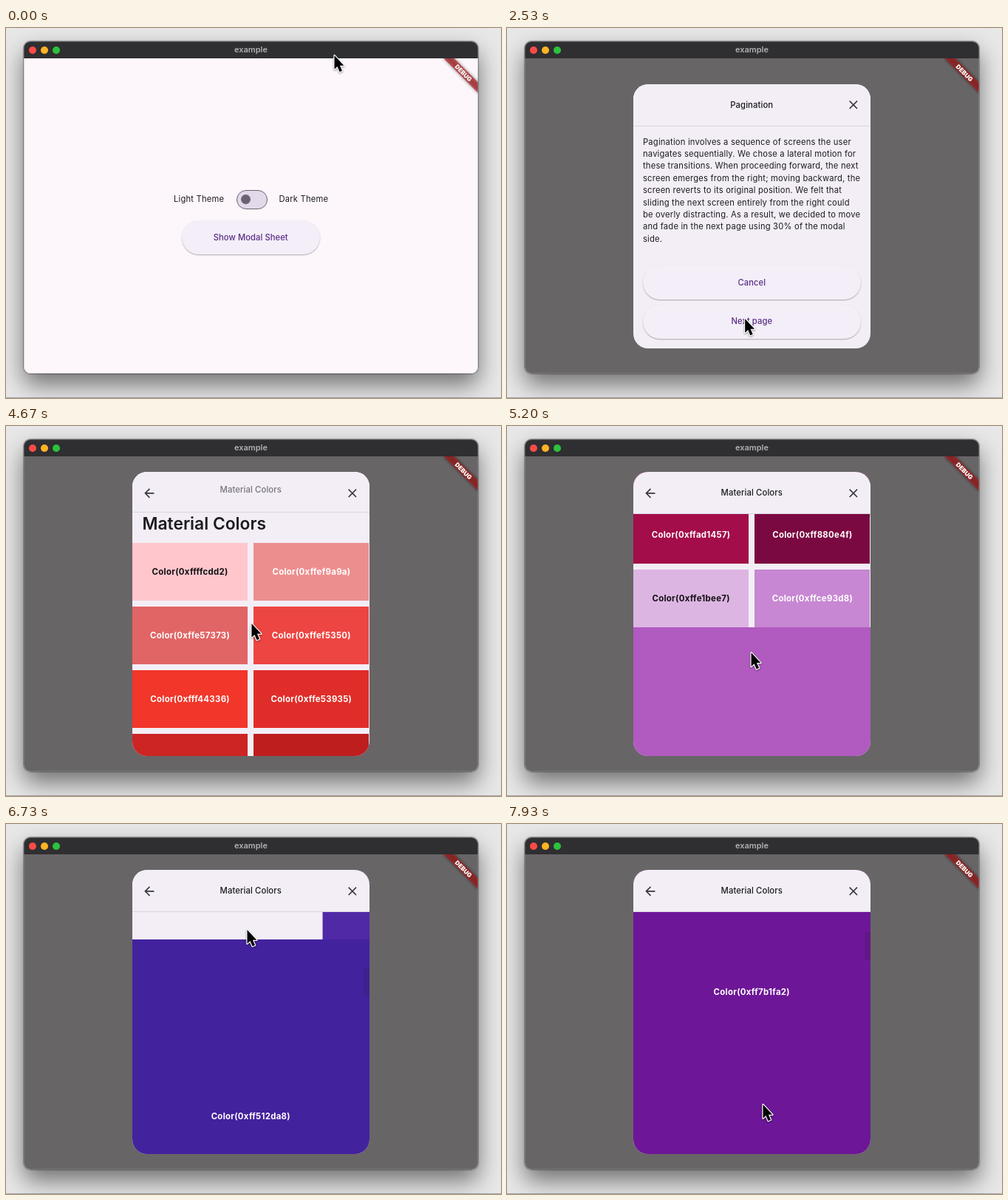
An HTML page for the animation above (8 s loop, 670 by 500 pixels).

```html
<!DOCTYPE html>
<html lang="en">
<head>
<meta charset="utf-8">
<title>Modal sheet</title>
<style>
html, body { margin: 0; width: 100%; height: 100%; overflow: hidden; }
body { position: relative; background: #e8e8e8; font: 400 11.2px/16.4px Inter, "Open Sans", sans-serif; color: #1d1b20; }
div, svg { position: absolute; box-sizing: border-box; }
.mid { display: flex; align-items: center; justify-content: center; white-space: nowrap; }

#stage { left: 0; top: 0; width: 670px; height: 500px; overflow: hidden; }
#floor { left: 0; top: 499px; width: 670px; height: 1px; background: #a6a6a6; }
#shadow, #win, #rim { left: 24px; top: 18px; width: 615px; height: 449px; border-radius: 9px; }
#shadow { box-shadow: 0 15px 32px rgba(0,0,0,.52), 0 0 1px 1px rgba(0,0,0,.3); }
#win { overflow: hidden; background: #fdf7fc; }
#rim { box-shadow: inset 0 0 0 1px rgba(150,150,150,.4); }
/* children of the window use stage coordinates */
#app { left: -24px; top: -18px; width: 670px; height: 500px; }
#bar { left: 24px; top: 18px; width: 615px; height: 23px; background: #2f2e31; color: #b2b1b3; font-weight: 600; font-size: 11px; }
.light { top: 6.5px; width: 10px; height: 10px; border-radius: 50%; }

.label { top: 223px; letter-spacing: .2px; white-space: nowrap; }
#track { left: 311.5px; top: 218.5px; width: 42px; height: 26px; border-radius: 13px; background: #e2daea; border: 1.7px solid #6b6470; }
#knob { left: 318px; top: 225px; width: 13px; height: 13px; border-radius: 50%; background: #6b6470; }
.btn { border-radius: 23px; background: #f3eef7; color: #5a2e87; font-weight: 500; letter-spacing: .08px; box-shadow: 0 1px 1.5px rgba(0,0,0,.3); }
#show { left: 238px; top: 260px; width: 186.5px; height: 45.5px; }
#ink { inset: 0; border-radius: 23px; overflow: hidden; }
#tint { inset: 0; background: #673ab7; }
#ripple { border-radius: 50%; background: #673ab7; }

#scrim { left: 24px; top: 41px; width: 615px; height: 426px; background: #000; }
#sheet { left: 171px; width: 320.5px; border-radius: 20px; overflow: hidden; background: #f3eef6; }
.page { left: 0; top: 0; width: 100%; height: 100%; }
.top { left: 0; top: 0; width: 100%; height: 57px; background: #f3eef6; border-bottom: 1px solid #d9d4dd; }
.title { left: 0; top: 0; width: 100%; height: 57px; font-weight: 500; font-size: 11.3px; letter-spacing: .1px; }
#copy { left: 13px; right: 13px; top: 70px; letter-spacing: .2px; }
.wide { left: 13px; right: 13px; height: 46px; }
#hero { left: 0; top: 0; width: 320.5px; height: 197px; background: #fffcfd; }
#heading { left: 13.5px; top: 209px; height: 32px; line-height: 32px; font-size: 22.8px; font-weight: 600; white-space: nowrap; }
.tile { font-weight: 700; font-size: 11.4px; letter-spacing: .3px; color: #fff; }
#thumb { right: 0; width: 8px; height: 37px; background: rgba(28,27,31,.13); }
.icon { top: 18.7px; width: 19.7px; height: 19.7px; fill: #39363d; }

#ribbon { left: 639px; top: 41px; width: 0; height: 0; transform: rotate(45deg); }
#ribbon div { left: -33px; top: 23px; width: 66px; height: 9.9px; }
#ribbon .dark { background: rgba(0,0,0,.5); filter: blur(2px); }
#ribbon .red { background: rgba(183,28,28,.63); color: #fff; font-weight: 900; font-size: 8.2px; }
#cursor { left: 0; top: 0; width: 24px; height: 32px; overflow: visible; filter: drop-shadow(0 1.5px 1.2px rgba(0,0,0,.4)); }
</style>
</head>
<body>
<div id="stage">
  <div id="floor"></div>
  <div id="shadow"></div>
  <div id="win"><div id="app">
    <div class="label" style="left:227px">Light Theme</div>
    <div class="label" style="left:369.5px">Dark Theme</div>
    <div id="track"></div><div id="knob"></div>
    <div id="show" class="btn">
      <div id="ink"><div id="tint"></div><div id="ripple"></div></div>
      <div class="mid" style="inset:0">Show Modal Sheet</div>
    </div>
    <div id="scrim"></div>
    <div id="sheet">
      <div id="intro" class="page">
        <div id="copy">Pagination involves a sequence of screens the user navigates sequentially. We chose a lateral motion for these transitions. When proceeding forward, the next screen emerges from the right; moving backward, the screen reverts to its original position. We felt that sliding the next screen entirely from the right could be overly distracting. As a result, we decided to move and fade in the next page using 30% of the modal side.</div>
        <div class="top"></div>
        <div class="title mid">Pagination</div>
        <div class="btn wide mid" style="bottom:65.5px">Cancel</div>
        <div class="btn wide mid" style="bottom:13px">Next page</div>
      </div>
      <div id="colors" class="page">
        <div id="list" class="page">
          <div id="hero"><svg width="320.5" height="197">
            <circle cx="77.5" cy="41.5" r="22.7" fill="#ff5500"/>
            <path d="M189.5 45.5 46 169.5H274Z" fill="#fb9d0e" stroke="#fb9d0e" stroke-width="8" stroke-linejoin="round"/>
          </svg></div>
          <div id="heading">Material Colors</div>
        </div>
        <div id="thumb"></div>
        <div id="top" class="top"></div>
        <div id="title" class="title mid">Material Colors</div>
      </div>
      <svg id="back" class="icon" style="left:13.2px" viewBox="0 0 24 24"><path d="M20 11H7.83l5.59-5.59L12 4l-8 8 8 8 1.41-1.41L7.83 13H20z"/></svg>
      <svg class="icon" style="left:288.2px" viewBox="0 0 24 24"><path d="M19 6.41 17.59 5 12 10.59 6.41 5 5 6.41 10.59 12 5 17.59 6.41 19 12 13.41 17.59 19 19 17.59 13.41 12z"/></svg>
    </div>
    <div id="ribbon"><div class="dark"></div><div class="red mid">DEBUG</div></div>
    <div id="bar" class="mid">example
      <div class="light" style="left:6.5px;background:#fb4b47"></div>
      <div class="light" style="left:22.5px;background:#fdb424"></div>
      <div class="light" style="left:38.5px;background:#2bc23e"></div>
    </div>
  </div></div>
  <div id="rim"></div>
  <svg id="cursor"><path d="M.5 0V18.7L4.5 15 7.6 22.2 11 20.7 7.9 13.7H13.4Z" stroke="#fff" stroke-width="2.4" paint-order="stroke" stroke-linejoin="round"/></svg>
</div>
<script>
const $ = id => document.getElementById(id);
const clamp = v => Math.min(1, Math.max(0, v));
const ramp = (v, a, b) => clamp((v - a) / (b - a));
const smooth = u => u * u * (3 - 2 * u);
const mix = (a, b, u) => a + (b - a) * u;

// Monotone cubic curve through [time, value...] points
function curve(pts, t, c = 1) {
  const last = pts.length - 1;
  if (t <= pts[0][0]) return pts[0][c];
  if (t >= pts[last][0]) return pts[last][c];
  let i = 0;
  while (t >= pts[i + 1][0]) i++;
  const slope = j => (pts[j + 1][c] - pts[j][c]) / (pts[j + 1][0] - pts[j][0]);
  const tangent = j => {
    if (j === 0 || j === last) return 0;
    const a = slope(j - 1), b = slope(j);
    return a * b <= 0 ? 0 : 2 * a * b / (a + b);
  };
  const h = pts[i + 1][0] - pts[i][0], u = (t - pts[i][0]) / h;
  return mix(pts[i][c], pts[i + 1][c], smooth(u))
    + h * u * (1 - u) * ((1 - u) * tangent(i) - u * tangent(i + 1));
}

const pointer = [
  [70, 444, 37], [400, 395, 165], [830, 342, 292], [1900, 342, 292],
  [2400, 322, 393], [3000, 321, 393], [3670, 319, 380], [4150, 324, 422],
  [4670, 332, 267], [4800, 333, 208], [5100, 331, 270], [5480, 328, 400],
  [5800, 328, 220], [5930, 327, 140], [6200, 327, 260], [6450, 326, 400],
  [6730, 326, 143], [6900, 326, 118], [7150, 330, 350], [7350, 335, 300],
  [7620, 342, 142], [7930, 346, 379], [8000, 347, 410]
];
const scroll = [
  [4150, 0], [4670, 155], [4780, 215], [5100, 800], [5480, 1080],
  [5800, 1263], [5920, 1345], [6150, 3200], [6450, 4580], [6730, 4837],
  [6820, 4868], [6950, 4880], [7150, 4650], [7350, 3900], [7620, 3330],
  [7930, 3091], [8000, 3000]
];

// Shades 100 to 900 of red, pink, purple, deep purple
const shades = (
  "ffcdd2 ef9a9a e57373 ef5350 f44336 e53935 d32f2f c62828 b71c1c " +
  "f8bbd0 f48fb1 f06292 ec407a e91e63 d81b60 c2185b ad1457 880e4f " +
  "e1bee7 ce93d8 ba68c8 ab47bc 9c27b0 8e24aa 7b1fa2 6a1b9a 4a148c " +
  "d1c4e9 b39ddb 9575cd 7e57c2 673ab7 5e35b1 512da8 4527a0 311b92").split(" ");
const W = 320.5, TALL = 478.5, GRID = 251, LIST = GRID + 852, MAX = 12750;

// Screen rendering is a little deeper than the nominal shade
const deepen = hex => "rgb(" + hex.match(/../g)
  .map(p => Math.round(255 * (parseInt(p, 16) / 255) ** 1.16)) + ")";

function addTile(i, x, y, w, h) {
  const el = document.createElement("div");
  el.className = "tile mid";
  el.textContent = `Color(0xff${shades[i]})`;
  el.style.cssText = `left:${x}px;top:${y}px;width:${w}px;height:${h}px;background:${deepen(shades[i])}`;
  if (i % 9 === 0) el.style.color = "#111";
  $("list").append(el);
  return el;
}
for (let i = 0; i < 20; i++)
  addTile(i, i % 2 * 164.3, GRID + (i >> 1) * 86, 156.2, 78);
for (let i = 0; i < 5; i++) addTile(20 + i, 0, LIST + i * TALL, W, TALL);
const shifters = [];
for (let i = 0; i < 6; i++) {
  const y = LIST + (5 + i) * TALL;
  shifters.push({ y, el: addTile(30 + i, 0, y, W, TALL) });
}

function drawButton(t) {
  const hover = ramp(t, 740, 860), press = ramp(t, 1270, 1450);
  $("tint").style.opacity = .07 * hover + .13 * press;
  const grow = t < 1540 ? ramp(t, 1270, 1915) : mix(.42, 1, ramp(t, 1540, 1700));
  const r = 30 + 71 * grow, x = mix(342, 331, grow) - 238, y = mix(293, 283, grow) - 260;
  Object.assign($("ripple").style, {
    left: x - r + "px", top: y - r + "px", width: 2 * r + "px", height: 2 * r + "px",
    opacity: .12 * ramp(t, 1260, 1330) * (1 - ramp(t, 1640, 1840))
  });
}

function drawSheet(t) {
  const open = smooth(ramp(t, 1600, 1900));
  $("scrim").style.opacity = .59 * open;
  $("sheet").style.opacity = open;

  const p = ramp(t, 2700, 3050), e = smooth(p), h = mix(357, 384, e);
  $("sheet").style.top = 254 - h / 2 + "px";
  $("sheet").style.height = h + "px";
  $("intro").style.opacity = 1 - ramp(p, 0, .43);
  $("intro").style.transform = `translateX(${-96 * e}px)`;
  $("colors").style.opacity = $("back").style.opacity = ramp(p, .29, 1);
  $("colors").style.transform = `translateX(${96 * (1 - e)}px)`;
}

function drawList(t) {
  const s = Math.round(curve(scroll, t));
  $("list").style.transform = `translateY(${-s}px)`;
  for (const { y, el } of shifters)
    el.style.transform = `translateX(${W * ramp(s, y, y + TALL)}px)`;

  $("thumb").style.top = s / MAX * 347 + "px";
  $("thumb").style.opacity = ramp(s, 0, 20);

  const settle = ramp(s, 137, 175);
  $("top").style.opacity = ramp(s, 132, 142);
  $("top").style.transform = `translateY(${-4 * (1 - settle)}px)`;
  $("title").style.opacity = mix(0, 1, ramp(s, 132, 172));
  $("title").style.transform = `translateY(${-8 * (1 - settle)}px)`;
}

function draw(now) {
  const step = Math.floor((now % 8000 + 4) * 15 / 1000);
  const t = Math.round(step * 100 / 15) * 10;
  drawButton(t);
  drawSheet(t);
  drawList(t);
  $("cursor").style.transform = `translate(${curve(pointer, t, 1)}px, ${curve(pointer, t, 2)}px)`;
}

const start = performance.now();
function tick() {
  draw(performance.now() - start);
  requestAnimationFrame(tick);
}
tick();
</script>
</body>
</html>
```
